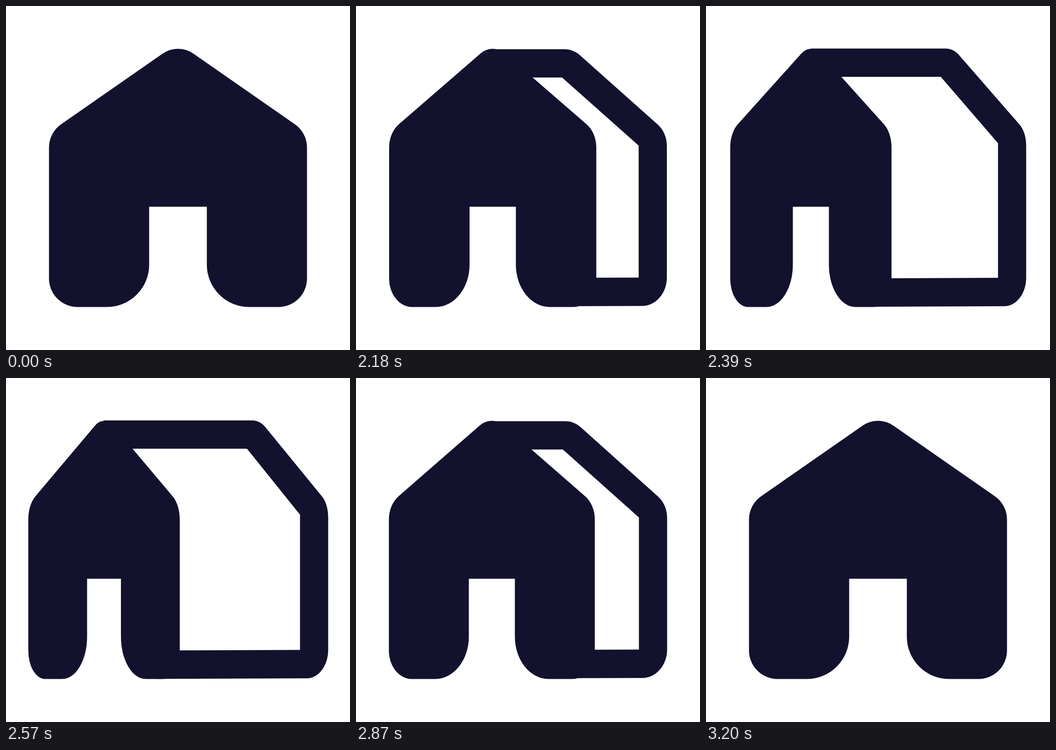
These frames come from a looping animation (748x748 px, 3.23 s). An HTML page with a canvas:

```html
<!DOCTYPE html>
<html lang="en">
<head>
<meta charset="utf-8">
<title>House turn</title>
<style>
  html, body { margin: 0; width: 100%; height: 100%; overflow: hidden; background: #fff; }
  canvas { display: block; width: 748px; height: 748px; }
</style>
</head>
<body>
<canvas id="stage" width="748" height="748"></canvas>
<script>
const ctx = document.getElementById('stage').getContext('2d');
const INK = '#12122e';
const LOOP = 3230, START = 2030, END = 3200, STEP = 30;
const MAX_TURN = 0.414;

// Cubic bezier easing with handles (x1, 0) and (x2, 1)
function ease(x, x1, x2) {
  if (x <= 0) return 0;
  if (x >= 1) return 1;
  let lo = 0, hi = 1;
  for (let i = 0; i < 30; i++) {
    const s = (lo + hi) / 2, r = 1 - s;
    if (3 * x1 * s * r * r + 3 * x2 * s * s * r + s * s * s < x) lo = s;
    else hi = s;
  }
  return lo * lo * (3 - 2 * lo);
}

function turnAt(t) {
  const out = ease((t - 2009) / 600, 0.235, 0.223);
  const back = ease((t - 2689) / 520, 0.1535, 0.42);
  return MAX_TURN * (out - back);
}

function corner(p, m, q, f) {
  ctx.bezierCurveTo(
    p[0] + (m[0] - p[0]) * f, p[1] + (m[1] - p[1]) * f,
    q[0] + (m[0] - q[0]) * f, q[1] + (m[1] - q[1]) * f, q[0], q[1]);
}

function fillPath(color) {
  ctx.closePath();
  ctx.fillStyle = color;
  ctx.fill();
}

const frontX = (x, k) => 93.5 - 109 * k + (x - 93.5) * (1 - k);

function drawFront(k) {
  const R = 62, DOOR = 92;
  ctx.save();
  ctx.translate(frontX(0, k), 0);
  ctx.scale(1 - k, 1);
  ctx.beginPath();
  ctx.moveTo(93.5, 450);
  ctx.arcTo(93.5, 275.4, 374, 80.2, R);
  ctx.arcTo(374, 80.2, 654.5, 275.4, 59);
  ctx.arcTo(654.5, 275.4, 654.5, 450, R);
  ctx.arcTo(654.5, 654.5, 560, 654.5, R);
  ctx.arcTo(436.7, 654.5, 436.7, 436.5, DOOR);
  ctx.lineTo(436.7, 436.5);
  ctx.lineTo(311.3, 436.5);
  ctx.arcTo(311.3, 654.5, 180, 654.5, DOOR);
  ctx.arcTo(93.5, 654.5, 93.5, 450, R);
  fillPath(INK);
  ctx.restore();
}

function drawSide(k) {
  const mid = frontX(374, k), leg = frontX(570, k);
  const right = 653.5 + 114 * k, top = 95.5 - 8 * k, bottom = 651.5 + 3.5 * k;
  const sag = 3 * k;
  const ridge = [415 + 359 * k, 106], eave = [628 + 144 * k, 258];
  const slope = (eave[1] - ridge[1]) / (eave[0] - ridge[0]);
  const flat = [379 + 380 * k, top];
  const wall = [right, 304], foot = [right, bottom - 62], base = [right - 61 + 36 * k, bottom];

  ctx.beginPath();
  ctx.moveTo(mid, top);
  ctx.lineTo(...flat);
  corner(flat, [ridge[0] + (top - ridge[1]) / slope, top], ridge, 0.63);
  ctx.lineTo(...eave);
  corner(eave, [right, eave[1] + (right - eave[0]) * slope], wall, 0.63);
  ctx.lineTo(...foot);
  corner(foot, [right, bottom], base, 0.552);
  ctx.lineTo(leg, bottom + sag);
  fillPath(INK);

  ctx.beginPath();
  ctx.moveTo(mid, top + 61.5);
  ctx.lineTo(379 + 351 * k, top + 61.5);
  ctx.lineTo(right - 61.3, 309 - 28.5 * k);
  ctx.lineTo(right - 61.3, bottom - 61.8);
  ctx.lineTo(leg, bottom + sag - 61.8);
  fillPath('#fff');
}

function render(time) {
  const t = time % LOOP;
  const moving = t >= START && t < END;
  const k = moving ? turnAt(START + Math.floor((t - START) / STEP) * STEP) : 0;
  ctx.fillStyle = '#fff';
  ctx.fillRect(0, 0, 748, 748);
  if (moving) drawSide(k);
  drawFront(k);
}

const origin = performance.now();
function tick() {
  render(performance.now() - origin);
  requestAnimationFrame(tick);
}
tick();
</script>
</body>
</html>
```
